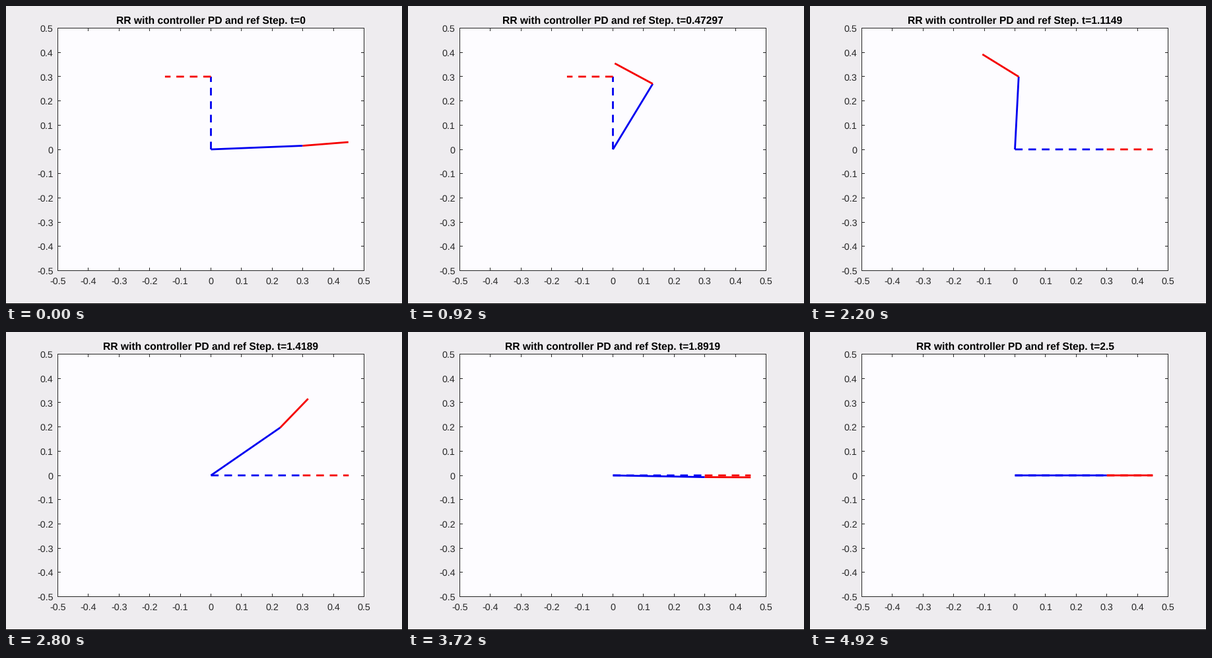
Write a matplotlib script that moves like this. It is 600 px wide and 451 px high and loops after 5 s.

```python
import numpy as np
import matplotlib.pyplot as plt
from matplotlib.animation import FuncAnimation

W, H, DPI = 600, 451, 72          # at 72 dpi one point is one pixel
FRAMES, INTERVAL = 125, 40
STEPS, T_END, T_SWITCH = 75, 2.5, 1.0
L1, L2 = 0.3, 0.15
LEFT, RIGHT, TOP, BOTTOM = 78.5, 542.5, 33.5, 400.5
BLUE, RED, INK = "#0000f0", "#f50000", "#262626"
START, UP = 0.05, np.pi / 2

plt.rcParams["font.family"] = "Liberation Sans"
plt.rcParams["text.hinting"] = "none"


def to_px(x, y):
    return LEFT + (x + 0.5) * (RIGHT - LEFT), BOTTOM - (y + 0.5) * (BOTTOM - TOP)


def hermite(x, a, b):
    """Cubic between two (position, value, slope) knots."""
    h = b[0] - a[0]
    s = (x - a[0]) / h
    return ((1 + 2 * s) * (1 - s) ** 2 * a[1] + s * (1 - s) ** 2 * h * a[2]
            + s * s * (3 - 2 * s) * b[1] + s * s * (s - 1) * h * b[2])


KNOTS = [(0.473, 0.295, -3.06), (0.709, 0.013, -0.32),
         (0.892, -0.015, 0), (1.5, 0, 0)]


def shoulder_error(tau):
    """Remaining share of the step: speeding up, then braking with overshoot."""
    if tau < KNOTS[0][0]:
        return 1 - 3.273 * tau ** 2.05
    for a, b in zip(KNOTS, KNOTS[1:]):
        if tau <= b[0]:
            return hermite(tau, a, b)
    return 0.0


def elbow_error(tau, slow=5.1, fast=60):
    return (fast * np.exp(-slow * tau) - slow * np.exp(-fast * tau)) / (fast - slow)


def rise(tau):
    return (UP + (START - UP) * shoulder_error(tau),
            UP + (START - UP) * elbow_error(tau))


def pose(t):
    if t < T_SWITCH:
        return rise(t)
    q1, q2 = rise(T_SWITCH)
    tau = t - T_SWITCH
    return q1 * shoulder_error(tau), q2 * elbow_error(tau)


def joints(q1, q2):
    elbow = L1 * np.cos(q1), L1 * np.sin(q1)
    tip = elbow[0] + L2 * np.cos(q1 + q2), elbow[1] + L2 * np.sin(q1 + q2)
    return to_px(0, 0), to_px(*elbow), to_px(*tip)


fig = plt.figure(figsize=((W + 1e-6) / DPI, (H + 1e-6) / DPI), dpi=DPI,
                 facecolor="#eeecef")
ax = fig.add_axes([0, 0, 1, 1])
ax.set_xlim(0, W)
ax.set_ylim(H, 0)
ax.axis("off")


def rule(x0, y0, x1, y1, color=INK):
    ax.plot([x0, x1], [y0, y1], color=color, lw=1, solid_capstyle="projecting",
            snap=False, zorder=2)


def pixel_center(v):
    return np.floor(v + 1e-6) + 0.5


ax.fill([LEFT, RIGHT, RIGHT, LEFT], [TOP, TOP, BOTTOM, BOTTOM],
        color="#fdfcff", lw=0, snap=False, zorder=1)
for y in (TOP, BOTTOM):
    rule(LEFT, y, RIGHT, y)
for x in (LEFT, RIGHT):
    rule(x, TOP, x, BOTTOM)
rule(0, H - 0.5, W, H - 0.5, "black")

TICK = 4
for i in range(-5, 6):
    x, y = to_px(i / 10, i / 10)
    label = f"{i / 10:g}"
    ax.text(x, 421, label, size=14.2, color=INK, ha="center", va="baseline")
    ax.text(71.5, y + 5.5, label, size=14.2, color=INK, ha="right", va="baseline")
    x, y = pixel_center(x), pixel_center(y)
    rule(x, BOTTOM, x, BOTTOM - TICK)
    rule(x, TOP, x, TOP + TICK)
    rule(LEFT, y, LEFT + TICK, y)
    rule(RIGHT, y, RIGHT - TICK, y)

title = ax.text((LEFT + RIGHT) / 2, 26.5, "", size=15.65, weight="bold",
                color="black", ha="center", va="baseline")


def link(color, z, **style):
    return ax.plot([], [], color=color, lw=2.8, snap=False, zorder=z, **style)[0]


DASH = dict(linestyle=(0, (11.6 / 2.8, 8.8 / 2.8)), dash_capstyle="butt")
SOLID = dict(solid_capstyle="butt")
goal = link(BLUE, 3, **DASH), link(RED, 3, **DASH)
arm = link(BLUE, 4, **SOLID), link(RED, 4, **SOLID)


def place(links, points):
    for line, a, b in zip(links, points, points[1:]):
        line.set_data([a[0], b[0]], [a[1], b[1]])


def update(n):
    k = (3 * n + 1) // 5          # 75 poses spread over 125 ticks
    t = k * T_END / (STEPS - 1)
    target = UP if t < T_SWITCH else 0.0
    place(goal, joints(target, target))
    place(arm, joints(*pose(t)))
    title.set_text(f"RR with controller PD and ref Step. t={t:.5g}")
    return [*goal, *arm, title]


anim = FuncAnimation(fig, update, frames=FRAMES, interval=INTERVAL,
                     repeat=True, repeat_delay=0, blit=False)
plt.show()
```
